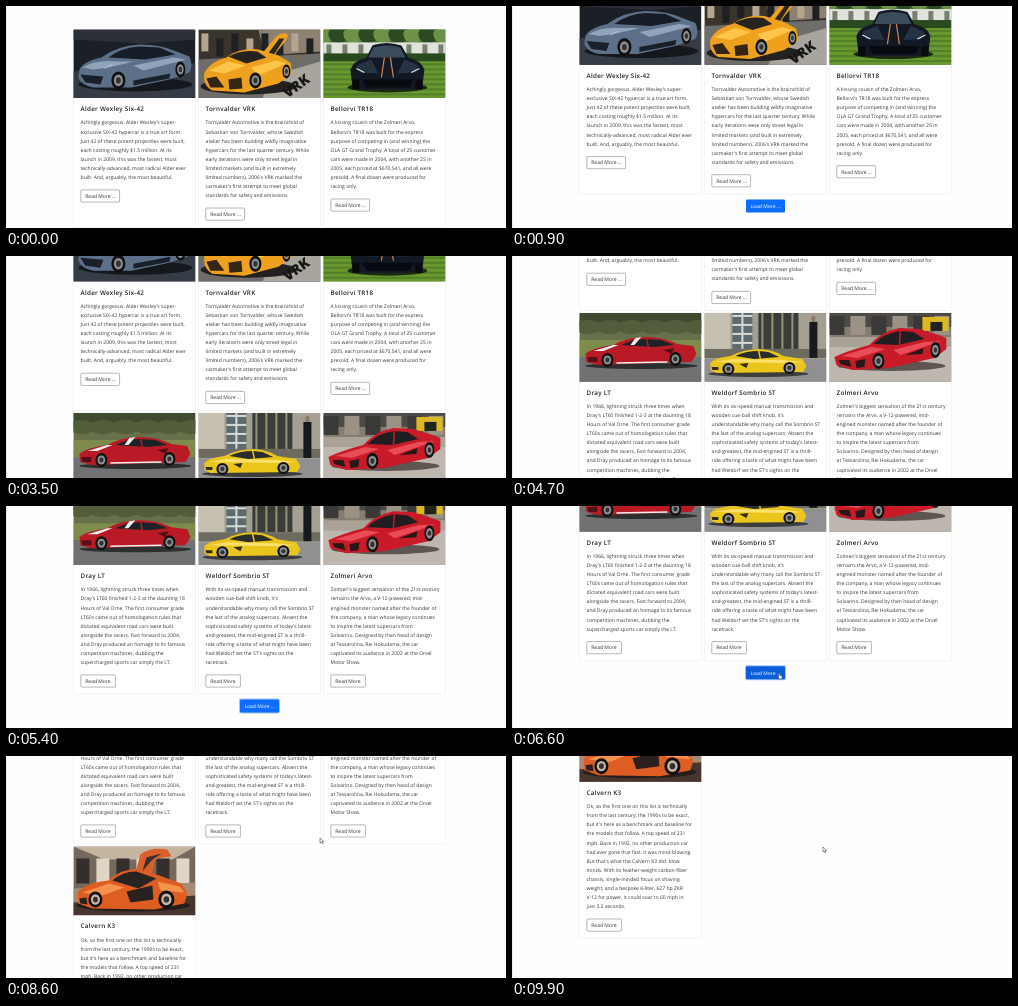
Recreate the animation shown at these times as an HTML page. Size 500x222 px, loop 10000 ms.

```html
<!DOCTYPE html>
<html lang="en">
<head>
<meta charset="utf-8">
<title>Load more cards</title>
<style>
  html, body { margin: 0; width: 100%; height: 100%; overflow: hidden; background: #fefefe; }
  svg { display: block; }
  text { font: 5.04px "Open Sans", "Noto Sans", sans-serif; fill: #33373b; text-rendering: geometricPrecision; white-space: pre; }
  .title { font-size: 6.3px; font-weight: 600; letter-spacing: .25px; fill: #212529; }
  .card { fill: #fff; stroke: #ebebeb; stroke-width: .6; }
  .read { fill: #fff; stroke: #6b7075; stroke-width: .5; }
  #load text { fill: #fff; }
</style>
</head>
<body>
<svg id="stage" width="500" height="222" viewBox="0 0 500 222"></svg>
<script>
const box = (c, x, y, w, h) => `<rect fill="${c}" x="${x}" y="${y}" width="${w}" height="${h}"/>`;
const shape = (c, d) => `<path fill="${c}" d="${d}"/>`;
const line = (c, w, d) => `<path fill="none" stroke="${c}" stroke-width="${w}" d="${d}"/>`;
const oval = (c, x, y, rx, ry) => `<ellipse fill="${c}" cx="${x}" cy="${y}" rx="${rx}" ry="${ry}"/>`;
const wheel = (x, y, rx, ry, rim = '#8d9092') =>
  oval('#111', x, y, rx, ry) + oval(rim, x, y, rx * .65, ry * .65) + oval('#333', x, y, rx * .35, ry * .35);
const row = (n, f) => Array.from({ length: n }, (_, i) => f(i)).join('');

// Simplified pictures, 122 x 68.7 each
const photos = [
  box('#1b1f26', 0, 0, 122, 69) + shape('#2b3039', 'M0 0H122V10L70 14 0 10z') +
  shape('#363c46', 'M0 42L122 34V69H0z') + oval('#14171c', 62, 55, 57, 7) +
  shape('#5d7089', 'M6 40Q10 32 28 28Q44 16 66 15Q88 15 103 22L116 27Q120 36 116 43L96 50 58 58 20 58Q8 56 5 48z') +
  shape('#171d26', 'M35 28Q48 18 66 17L86 18 102 25 72 30z') +
  shape('#91a4bb', 'M9 38Q24 30 42 32L60 32Q38 38 20 40zM60 36L100 28 113 30 70 41z') +
  shape('#1a2029', 'M7 45L30 47 27 55 12 53zM60 51L97 44 96 49 60 56z') + line('#c3d0de', .8, 'M31 39L39 35') +
  wheel(45, 51, 7, 9) + wheel(107, 40, 5, 8),

  box('#39342c', 0, 0, 122, 69) + shape('#8d8171', 'M60 0H122V22L66 26z') +
  row(8, i => box(i % 3 ? '#1f2022' : '#b3a58e', 3 + i * 15, 4 + i % 2 * 5, 7, 18)) +
  shape('#6f6d69', 'M0 30L122 24V69H0z') + shape('#a8a59f', 'M74 46L122 32V69H64z') + oval('#23211f', 50, 57, 48, 8) +
  shape('#eda11f', 'M62 26L78 7Q86 1 90 6L86 13 72 30z') + shape('#292624', 'M69 25L81 9 86 9 75 26z') +
  shape('#eda11f', 'M6 43Q12 32 28 28Q42 18 60 20L80 26 92 33 94 44 80 54 46 63 14 61Q4 56 6 43z') +
  shape('#25221f', 'M30 27Q44 20 59 22L68 28 48 34z') +
  shape('#ffc44a', 'M10 41L30 32 47 36 26 44zM53 38L78 31 88 34 60 46z') +
  shape('#342515', 'M8 49L18 47 26 58 12 58zM30 50L43 48 44 59 31 60z') +
  wheel(57, 51, 6, 8) + wheel(88, 42, 4, 7) +
  '<text transform="translate(89 69) rotate(-36)" style="font-size:14px;font-weight:800;fill:#171717">VRK</text>',

  box('#4a7032', 0, 0, 122, 69) + row(9, i => oval(i % 2 ? '#2b4a22' : '#6d9148', i * 15, 5, 10, 9)) +
  box('#dfe3dc', 0, 13, 122, 12) + row(8, i => box('#77806f', 3 + i * 16, 15, 5, 10)) + box('#284a1e', 0, 24, 122, 8) +
  box('#69982f', 0, 32, 122, 37) + row(7, i => box('#537f28', 0, 34 + i * 5, 122, 2)) + oval('#1c2a13', 64, 58, 40, 5) +
  shape('#121924', 'M27 40Q30 31 43 28L49 16Q63 11 78 16L85 28Q98 31 101 40L99 57 88 60H40L29 57z') +
  shape('#3a4b5b', 'M50 18Q64 14 77 18L82 28H45z') +
  shape('#263345', 'M33 36L48 30 55 44 37 43zM95 36L81 30 74 44 92 43z') +
  line('#cf8650', 1.2, 'M61 28L58 48M67 28L70 48') + shape('#070a0f', 'M39 50H90L86 58H43z') +
  line('#dfe8ef', 1.1, 'M33 39L41 43M96 39L88 43') + box('#090a0b', 29, 50, 7, 10) + box('#090a0b', 92, 50, 7, 10),

  box('#66704a', 0, 0, 122, 69) + box('#3f4a31', 0, 0, 122, 14) + row(6, i => oval('#515d3b', 8 + i * 22, 14, 14, 7)) +
  box('#7f8a4d', 0, 27, 122, 17) + box('#6f7173', 0, 44, 122, 25) + oval('#2d2e2e', 62, 53, 56, 3) +
  shape('#b91a26', 'M6 41Q12 35 34 32Q48 24 66 24Q84 24 98 31L114 33 117 41 112 49 18 52 7 49z') +
  shape('#1c2328', 'M42 32Q53 26 66 26L82 27 94 32 74 34z') + line('#b91a26', 1.5, 'M67 25L69 34') +
  shape('#f2eeee', 'M14 38L34 32 39 32 24 38zM56 25L62 24 55 32 51 32z') +
  line('#f1eeee', 1.6, 'M37 50L88 49') + shape('#541017', 'M8 44H18V49H9zM84 37L95 35 92 41z') +
  wheel(28, 47, 6, 7) + wheel(96, 46, 6, 7),

  box('#a39f92', 0, 0, 122, 69) + box('#c6c0b0', 0, 0, 26, 40) + box('#5d6a70', 28, 0, 20, 36) +
  row(4, i => box('#d7d9d4', 28, 2 + i * 9, 20, 2)) + box('#d7d9d4', 37, 0, 2, 36) + box('#3a3c38', 54, 0, 40, 36) +
  row(4, i => box('#98917a', 57 + i * 10, 0, 2, 36)) + box('#6d6a60', 0, 36, 122, 9) + box('#8e9091', 0, 46, 122, 23) +
  oval('#8c7665', 109, 6, 2, 3) + box('#17191c', 105, 9, 8, 36) + oval('#3d3d3d', 54, 61, 50, 3) +
  shape('#eac51b', 'M6 50Q9 45 26 43Q40 36 55 36Q70 37 79 43L98 46 102 53 99 59 12 60 6 57z') +
  shape('#2a2d2a', 'M31 43Q41 38 54 38L64 39 75 44 50 46z') + line('#eac51b', 1.5, 'M54 37L56 46') +
  shape('#fbe06a', 'M10 49L28 46 78 47 98 49 80 50z') + shape('#312d1c', 'M35 51L44 50 42 55zM7 54H14V57H8z') +
  wheel(24, 56, 6, 6) + wheel(85, 55, 6, 6),

  box('#857c72', 0, 0, 122, 69) + box('#4c4a47', 0, 0, 122, 14) + row(6, i => box(i % 2 ? '#9b9184' : '#3a3937', i * 21, 3, 15, 19)) +
  box('#dcb923', 93, 4, 26, 14) + box('#22221f', 101, 9, 12, 9) + box('#aaa297', 0, 24, 122, 10) +
  box('#beb7af', 0, 34, 122, 35) + oval('#5d5551', 62, 53, 54, 5) +
  shape('#c91a28', 'M5 44Q20 37 40 32Q51 19 70 15L90 16 109 22 117 25V36L105 45 60 55 23 57 7 52z') +
  shape('#201e23', 'M44 31Q53 21 70 18L84 19 95 26 69 32z') + line('#c91a28', 1.5, 'M71 17L70 32') +
  shape('#e84d57', 'M12 43L42 34 56 36 28 45zM64 37L95 29 112 28 71 42z') +
  shape('#271719', 'M9 47L20 47 22 54 11 51zM26 48L36 46 35 54 27 55zM76 42L94 35 93 41z') +
  wheel(49, 48, 6, 8) + wheel(106, 37, 5, 8),

  box('#75685c', 0, 0, 122, 69) + shape('#c5b49f', 'M0 0H122L99 13H31z') + row(6, i => box(i % 2 ? '#e1d6c5' : '#342e2c', 3 + i * 20, 12, 13, 25)) +
  shape('#a58b75', 'M0 42L122 36V69H0z') + shape('#45352e', 'M0 56L122 49V69H0z') + oval('#261d1a', 60, 59, 57, 6) +
  shape('#d9602a', 'M61 30L67 8Q77 0 94 3L98 10 82 12 77 34z') + shape('#3b302d', 'M69 25L73 11 88 7 78 14z') +
  shape('#dd5d22', 'M4 46Q13 36 35 34Q46 23 64 22L86 29 108 37 114 47 111 57 81 63 19 62 5 57z') +
  shape('#292323', 'M39 34Q49 25 63 25L83 32 65 42z') + shape('#f5924c', 'M9 46L36 37 51 41 29 49zM84 35L106 40 111 46 87 44z') +
  shape('#2a2020', 'M53 45L79 39 80 53 57 56zM6 52L13 51 14 58 7 57z') +
  wheel(22, 53, 7, 8, '#c9b7a4') + wheel(93, 53, 8, 9, '#c9b7a4')
];

const cards = [
  ['Alder Wexley Six-42', `Achingly gorgeous. Alder Wexley's super-|exclusive SIX-42 hypercar is a true art form.|Just 42 of these potent projectiles were built,|each costing roughly $1.5 million. At its|launch in 2009, this was the fastest, most|technically-advanced, most radical Alder ever|built. And, arguably, the most beautiful.`],
  ['Tornvalder VRK', `Tornvalder Automotive is the brainchild of|Sebastian von Tornvalder, whose Swedish|atelier has been building wildly imaginative|hypercars for the last quarter century. While|early iterations were only street legal in|limited markets (and built in extremely|limited numbers), 2006's VRK marked the|carmaker's first attempt to meet global|standards for safety and emissions.`],
  ['Bellorvi TR18', `A kissing cousin of the Zolmeri Arvo,|Bellorvi's TR18 was built for the express|purpose of competing in (and winning) the|OLA GT Grand Trophy. A total of 25 customer|cars were made in 2004, with another 25 in|2005, each priced at $670,541, and all were|presold. A final dozen were produced for|racing only.`],
  ['Dray LT', `In 1966, lightning struck three times when|Dray's LT60 finished 1-2-3 at the daunting 18|Hours of Val Orne. The first consumer grade|LT60s came out of homologation rules that|dictated equivalent road cars were built|alongside the racers. Fast forward to 2004,|and Dray produced an homage to its famous|competition machines, dubbing the|supercharged sports car simply the LT.`],
  ['Weldorf Sombrio ST', `With its six-speed manual transmission and|wooden cue-ball shift knob, it's|understandable why many call the Sombrio ST|the last of the analog supercars. Absent the|sophisticated safety systems of today's latest-|and-greatest, the mid-engined ST is a thrill-|ride offering a taste of what might have been|had Weldorf set the ST's sights on the|racetrack.`],
  ['Zolmeri Arvo', `Zolmeri's biggest sensation of the 21st century|remains the Arvo, a V-12-powered, mid-|engined monster named after the founder of|the company, a man whose legacy continues|to inspire the latest supercars from|Solvarino. Designed by then head of design|at Tessarolina, Rei Hokudama, the car|captivated its audience in 2002 at the Orvel|Motor Show.`],
  ['Calvern K3', `Ok, so the first one on this list is technically|from the last century, the 1990s to be exact,|but it's here as a benchmark and baseline for|the models that follow. A top speed of 231|mph. Back in 1992, no other production car|had ever gone that fast. It was mind-blowing.|But that's what the Calvern K3 did: blow|minds. With its feather-weight carbon-fiber|chassis, single-minded focus on shaving|weight, and a bespoke 6-liter, 627 hp ZKR|V-12 for power, it could soar to 60 mph in|just 3.2 seconds.`]
];

const LEAD = 9.07;

function card([title, body], i) {
  const lines = body.split('|'), n = lines.length, pad = 7.2, y = 97 + LEAD * n;
  const more = i < 3 ? ' ...' : '';
  // Cards in a row share the height of the tallest one
  return `<g transform="translate(${67.4 + i % 3 * 125} ${23.4 + Math.floor(i / 3) * 200.2})">
    <rect class="card" width="122" height="${116.2 + LEAD * Math.max(n, 9)}" rx="1"/>
    <svg width="122" height="68.7">${photos[i]}</svg>
    <text class="title" x="${pad}" y="81.8">${title}</text>
    ${lines.map((s, k) => `<text x="${pad}" y="${95.1 + LEAD * k}">${s}</text>`).join('')}
    <rect class="read" x="${pad + .2}" y="${y}" width="${more ? 38.8 : 34.6}" height="12.2" rx="1"/>
    <text x="${pad + 4.6}" y="${y + 7.9}">Read More${more}</text></g>`;
}

const stage = document.getElementById('stage');
stage.innerHTML = `<g id="page">
  ${[0, 3, 6].map(a => `<g class="row">${cards.slice(a, a + 3).map((c, k) => card(c, a + k)).join('')}</g>`).join('')}
  <g id="load"><rect id="ring" x="233" y="-1" width="41" height="15" rx="2" fill="#9ec5fe"/>
    <rect id="face" x="234" width="39" height="13" rx="1.3"/><text x="238.4" y="8.3">Load More ...</text></g></g>
  <path d="M.5 0V222" stroke="#ededed"/>
  <path id="cursor" fill="#fff" stroke="#333" stroke-width=".5"/>`;
const get = id => document.getElementById(id);
const page = get('page'), load = get('load'), ring = get('ring'), face = get('face'), cursor = get('cursor');
const rows = document.querySelectorAll('.row');

const ARROW = 'M0 0V5L1.2 3.9 2.1 5.8 2.9 5.4 2 3.6H3.6z';
const HAND = 'M.8 3.2V.5Q1.3-.2 1.8.5V2.2L4 2.7V4.8L3.5 6H1.4L0 3.9z';
const scrolls = [900, 1600, 4100, 4200, 4700, 4900, 5400, 5900, 8200, 8600, 8800, 9000, 9300, 9400];
// time, x, y, shape (no position: hidden)
const moves = [
  [0], [100, 259, 211, ARROW], [200],
  [2000, 290, 118, ARROW], [2100, 274, 146, ARROW], [2200, 260.5, 170, HAND],
  [2700, 262, 168.5, HAND], [2800, 263, 167.5, HAND], [3000, 262, 169, HAND], [3100, 261, 170, HAND], [3400],
  [6300, 298, 122, ARROW], [6400, 281, 147, ARROW], [6500, 266, 167, HAND], [7100, 266, 167, ARROW],
  ...Array.from({ length: 6 }, (_, i) => [7200 + i * 100, 266 + (i + 1) * 8, 167 - (i + 1) * 85 / 6, ARROW]),
  [9900, 311, 91, ARROW]
];
const fade = (t, start) => t < start ? 0 : t < start + 100 ? .5 : 1;

function draw() {
  const t = performance.now() % 10000;
  const steps = scrolls.filter(s => s <= t).length;
  page.setAttribute('transform', `translate(0 ${-steps * 100 / 3})`);
  rows[1].setAttribute('opacity', fade(t, 3400));
  rows[2].setAttribute('opacity', fade(t, 7100));

  load.setAttribute('transform', `translate(0 ${t < 3400 ? 226.9 : 426.9})`);
  load.setAttribute('visibility', t < 7100 ? 'visible' : 'hidden');
  ring.setAttribute('opacity', t < 3000 ? 0 : 1);
  const [, x, y, d] = moves.findLast(m => m[0] <= t);
  face.setAttribute('fill', d === HAND ? '#0b5ed7' : '#0d6efd');
  cursor.setAttribute('visibility', d ? 'visible' : 'hidden');
  if (d) {
    cursor.setAttribute('d', d);
    cursor.setAttribute('transform', `translate(${x} ${y})`);
  }
  requestAnimationFrame(draw);
}
draw();
</script>
</body>
</html>
```
